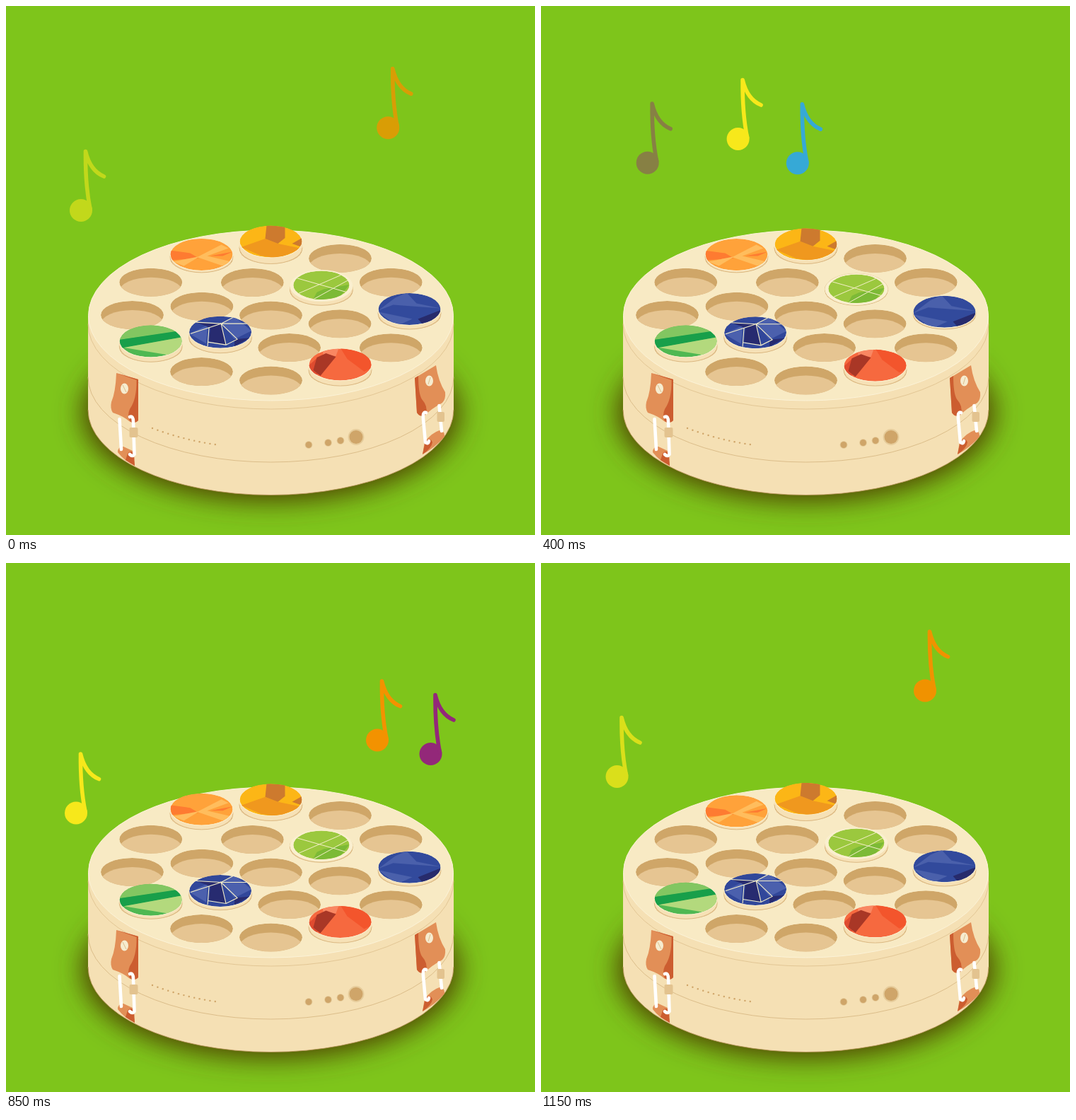
An HTML page that plays this animation: 748 by 748 pixels, repeating every 1.2 s.

```html
<!DOCTYPE html>
<html lang="en">
<head>
<meta charset="utf-8">
<title>Music box</title>
<style>
html, body { margin: 0; width: 100%; height: 100%; overflow: hidden; background: #7ec51b; }
svg { display: block; width: 100%; height: 100%; }
.thin { fill: none; stroke: #d9b985; stroke-width: .9; }
.rope { fill: none; stroke: #fff; stroke-width: 4.6; stroke-linecap: round; stroke-linejoin: round; }
.hide { fill: #e28f57; }
.dark { fill: #cc5d30; }
.bead { fill: #e3c38f; }
.knob { fill: #f6ecd0; }
.tan { fill: #cfa569; }
.halo { fill: #e6cc9b; }
</style>
</head>
<body>
<svg viewBox="0 0 748 748">
  <defs>
    <filter id="blur" x="-20%" y="-40%" width="140%" height="180%"><feGaussianBlur stdDeviation="19"/></filter>
    <clipPath id="hole"><ellipse rx="44.5" ry="20"/></clipPath>
    <clipPath id="face"><ellipse rx="44" ry="22.5"/></clipPath>
    <g id="pit" clip-path="url(#hole)">
      <ellipse rx="44.5" ry="20" fill="#cfa668"/>
      <ellipse cy="13" rx="44.5" ry="20" fill="#e6c592"/>
    </g>
  </defs>

  <ellipse cx="374.5" cy="575" rx="266" ry="125" fill="#4d3c05" filter="url(#blur)"/>
  <path d="M116 437.5V571A258.5 120.5 0 0 0 633 571V437.5Z" fill="#f5e0b4"/>
  <path d="M116 571A258.5 120.5 0 0 0 633 571" fill="none" stroke="#b9935a" stroke-width=".8"/>
  <path class="thin" d="M116 524.5A258.5 120.5 0 0 0 633 524.5"/>
  <path class="thin" d="M116 449.5A258.5 120.5 0 0 0 633 449.5" opacity=".75"/>
  <ellipse cx="374.5" cy="437.5" rx="258" ry="120.5" fill="#f8eac4" stroke="#fcf3d8"/>
  <g id="pits"></g>
  <g id="dots" class="tan"></g>

  <path class="hide" d="M156 519L187 528V586Q182 592 174 587Q166 580 151 575Q147 569 149 560Q155 546 156 519Z"/>
  <path class="dark" d="M156 519L187 528V586Q182 592 175 587Q171 579 175 570Q185 556 184.500 529Z"/>
  <ellipse class="knob" cx="167.500" cy="541" rx="5.500" ry="7.500"/>
  <path class="thin" d="M165 536L170 546"/>
  <path class="hide" d="M158 631Q158 623 166 623L179 629L182 650Q167 643 158 631Z"/>
  <path class="dark" d="M172 633Q176 627 181 633L182 650L169 642Z"/>
  <path class="rope" d="M160.500 584L163 627M175 581Q180 579 180 588L181.500 634Q179 638 175 634"/>
  <rect class="bead" x="174.500" y="596" width="12" height="14" rx="2"/>

  <path class="hide" d="M578 526L608 508Q611 530 621 546Q622 556 617 561Q602 569 592 579Q585 582 581 575Z"/>
  <path class="dark" d="M578 526L583 523Q583 548 588 556Q597 566 594 577Q587 583 581 575Z"/>
  <ellipse class="knob" cx="598.500" cy="530" rx="5.500" ry="7.500"/>
  <path class="thin" d="M600 525L597 535"/>
  <path class="hide" d="M592 616Q603 603 613 600Q621 601 620 609Q607 624 589 634Z"/>
  <path class="dark" d="M593 615Q600 609 603 617Q602 625 589 634Z"/>
  <path class="rope" d="M612.500 565L616 601M594 575Q589 573 590 584L593 617Q597 620 598 615"/>
  <rect class="bead" x="609.500" y="574" width="10.500" height="14" rx="2"/>

  <g id="gems"></g>
  <g id="notes"></g>
</svg>
<script>
const LOOP = 1200, GROW = 140, FADE = 250;
const $ = id => document.getElementById(id);
const add = (parent, tag, attrs) => {
  const el = document.createElementNS("http://www.w3.org/2000/svg", tag);
  for (const k in attrs) el.setAttribute(k, attrs[k]);
  return parent.appendChild(el);
};

// The holes: a centre, a ring of 6 and a ring of 12, seen at a slant
const ring = (n, r, turn) => Array.from({ length: n }, (_, i) => {
  const a = (turn + i * 360 / n) * Math.PI / 180;
  return [374.5 + r * Math.cos(a), 437 + r * .472 * Math.sin(a)];
});
const inner = ring(6, 101, 15), outer = ring(12, 196, 0);
for (const p of [[374.5, 437.5], ...inner, ...outer])
  add($("pits"), "use", { href: "#pit", transform: `translate(${p})` });

for (let u = 0; u < 92; u += 7.4)
  add($("dots"), "circle", { cx: 207 + u, cy: 597 + .377 * u - .00133 * u * u, r: 1.2 });
for (const [cx, cy, r] of [[428, 620.5, 4.5], [455.5, 617.5, 4.5], [473, 614.5, 4.5], [495, 609.5, 9.5]]) {
  add($("dots"), "circle", { cx, cy, r: r * 1.2, class: "halo" });
  add($("dots"), "circle", { cx, cy, r });
}

// Two ways a gem moves: a smooth sway, lowest at one time, or a slow rise and quick drop
const sway = low => t => Math.cos((t - low) / LOOP * 2 * Math.PI);
const rise = power => t => t < 150 ? t / 150 - 1 : -(((t - 150) / (LOOP - 150)) ** power);

const gems = [
  { spot: outer[9], lift: 4, size: 5, move: rise(1), fill: "#fcb616", facets: {
    "#f0981e": "M-42 8L-8 -4L10 3L44 10L10 24L-14 20Z",
    "#cd7a2e": "M-6 -23L20 -21L20 -5L10 3L-8 -4ZM30 3L44 -5V8Z" } },
  { spot: outer[8], lift: 4, size: 2.2, move: sway(210), fill: "#ffa23a", facets: {
    "#fe7b31": "M-45 -6L-16 -2L-4 5L-42 8ZM12 2L44 -4L30 2Z",
    "#ffbd5d": "M-40 10L-5 3L28 -14L38 -9L8 2L42 10L30 16L-5 4L-25 16Z" } },
  { spot: inner[5], lift: 1, size: 5, move: rise(4), scale: .9, fill: "#9bc83e", facets: {
    "#7cba36": "M4 6L44 -1L28 20L-14 24L-7 11Z" },
    seams: "M-38 -11L40 11M-36 13L31 -16M-14 23L44 -9" },
  { spot: outer[0], lift: 1, size: 5, move: rise(1), fill: "#324a9c", facets: {
    "#4a60ab": "M-44 2L-20 -16L-4 -23L10 -8L44 -1L-23 -6ZM-44 4L4 14L-18 24Z",
    "#272b6c": "M12 14L45 1L38 16L20 23Z" } },
  { spot: inner[2], lift: 6, size: 1.5, move: sway(750), fill: "#31479a", facets: {
    "#4b60ad": "M2 -12L20 -22L44 -2L20 10ZM-44 2L-18 -10L-20 16Z",
    "#272b70": "M-34 -14L1 -12L-16 -7ZM-14 -7L1 -12L8 18L-16 13ZM20 10L42 8L20 20Z" },
    seams: "M-34 -14L1 -12L44 -12M-42 2L1 -12L20 -22M-16 -7L-18 20M8 18L1 -12L24 10L8 18L-18 14" },
  { spot: outer[5], lift: 6, size: 1.5, move: sway(800), fill: "#4fb852", facets: {
    "#82c661": "M-45 -2L-30 -24H30L42 -14Z",
    "#189f4a": "M-45 -2L42 -15L45 -6L-42 10Z",
    "#b3d97d": "M-38 9L45 -6L42 14L28 20Z" } },
  { spot: outer[2], lift: 7, size: .8, move: sway(500), fill: "#f6693f", facets: {
    "#f3552c": "M0 -24L44 -14L45 5L34 10L10 -8Z",
    "#f98762": "M-25 -22L-2 -23L-6 -12L-24 -14Z",
    "#df4b2f": "M-45 2L-32 -10L-23 8L-36 16Z",
    "#a93726": "M-33 -10L-20 -16L-6 -11L-28 16L-38 8Z" } }
];
for (const g of gems) {
  const box = add($("gems"), "g", { transform: `translate(${g.spot[0]},${g.spot[1] - 2.5})` });
  const side = "#f6e1b6", size = { rx: 44.5, ry: 22.5 };
  add(box, "ellipse", { ...size, fill: side, stroke: "#d8b57e", "stroke-width": .9 });
  g.side = add(box, "rect", { x: -44.5, width: 89, fill: side });
  g.top = add(box, "g", {});
  add(g.top, "ellipse", { cy: .8, ...size, fill: "#faefcf" });
  const face = add(g.top, "g", { "clip-path": "url(#face)", transform: `scale(${g.scale || 1})` });
  add(face, "ellipse", { rx: 44, ry: 22.5, fill: g.fill });
  for (const fill in g.facets) add(face, "path", { d: g.facets[fill], fill });
  if (g.seams) add(face, "path", { d: g.seams, fill: "none", stroke: "#f5efc9", "stroke-width": 1.1 });
}

// A note is born, grows, drifts through its points [time, x, y] and fades from a given time
const yellow = "#f7e81b", purple = "#951b81";
const notes = [
  { color: purple, born: 0, fade: 250, path: [[150, 159, 275], [300, 154, 243]] },
  { color: yellow, born: 91, fade: 425, path: [[150, 257, 218.5], [300, 277, 203], [550, 281, 165.5]] },
  { color: "#36a9d6", born: 112, fade: 510, path: [[150, 363.5, 249.5], [300, 356, 231], [550, 373, 209]] },
  { color: "#f39200", born: 491, fade: 1145, path: [[550, 522, 305], [850, 525, 250.5], [1150, 543, 180.5], [1350, 532, 147]] },
  { color: yellow, born: 610, fade: 1090, path: [[850, 99, 353.5], [950, 104, 341], [1150, 107.5, 302], [1200, 106, 289]] },
  { color: purple, born: 610, fade: 830, path: [[850, 600.5, 270], [950, 595, 246]] }
];
for (const n of notes) {
  n.el = add($("notes"), "g", {});
  add(n.el, "circle", { r: 16, fill: n.color });
  add(n.el, "path", { d: "M13 -2Q6 -36 6.500 -83.500Q13 -56 32.500 -48", fill: "none", stroke: n.color,
    "stroke-width": 5.6, "stroke-linecap": "round", "stroke-linejoin": "round" });
}

const clamp = v => Math.min(1, Math.max(0, v));

// Straight drift between points, carried on past both ends
function along(path, t) {
  let i = 1;
  while (i < path.length - 1 && t > path[i][0]) i++;
  const [t0, x0, y0] = path[i - 1], [t1, x1, y1] = path[i], p = (t - t0) / (t1 - t0);
  return [x0 + (x1 - x0) * p, y0 + (y1 - y0) * p];
}

function draw(now) {
  const t = Math.floor(now % LOOP / 50) * 50;
  for (const g of gems) {
    const y = Math.min(0, g.size * g.move(t) - g.lift);
    g.top.setAttribute("transform", `translate(0,${y})`);
    g.side.setAttribute("y", y);
    g.side.setAttribute("height", -y);
  }
  for (const n of notes) {
    const age = t < n.born ? t + LOOP : t;
    n.el.setAttribute("transform", `translate(${along(n.path, age)}) scale(${clamp((age - n.born) / GROW)})`);
    n.el.setAttribute("opacity", clamp(1 - (age - n.fade) / FADE));
  }
}

let start;
function tick(now) {
  start ??= now;
  draw(now - start);
  requestAnimationFrame(tick);
}
draw(0);
requestAnimationFrame(tick);
</script>
</body>
</html>
```
